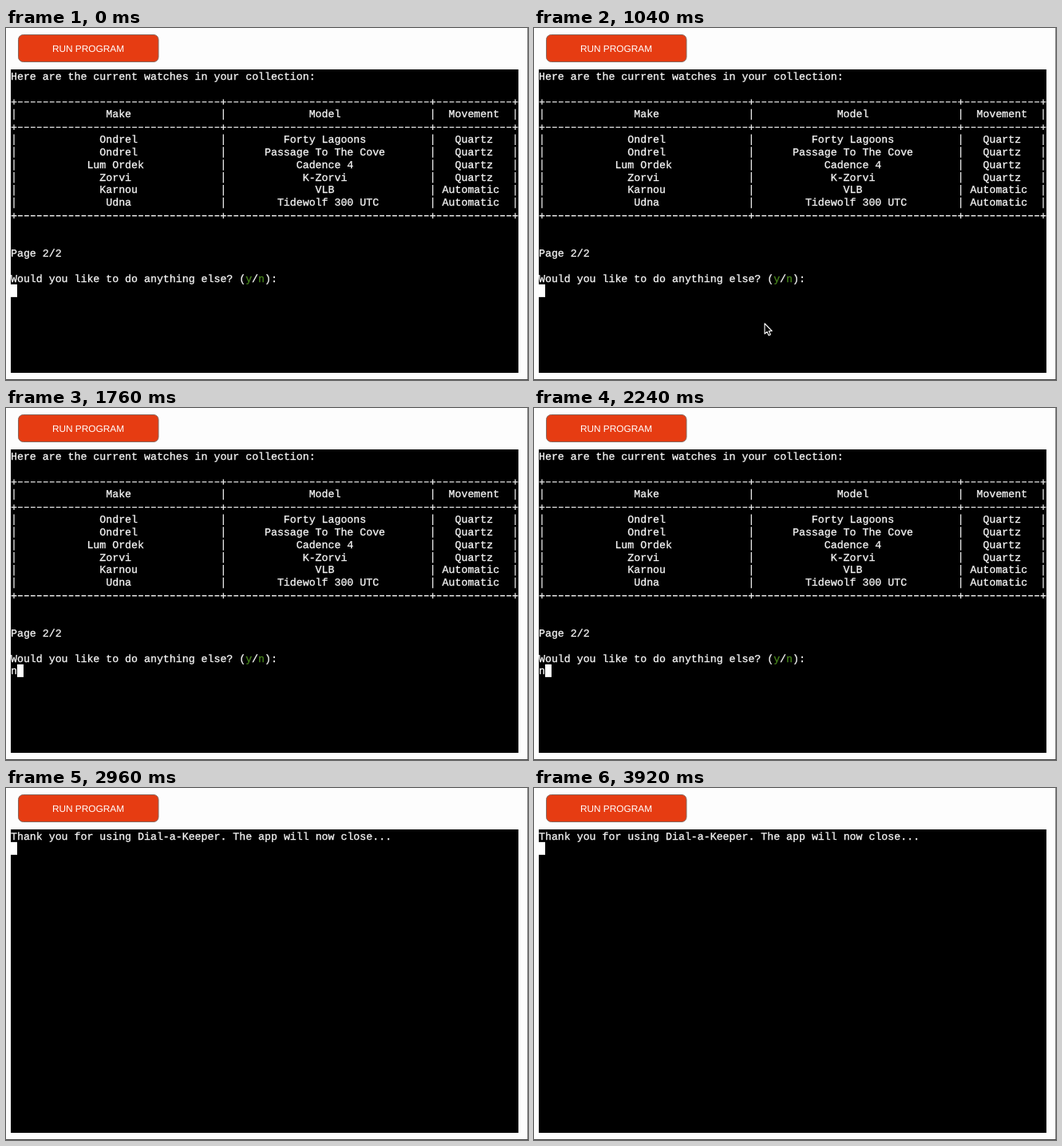
Write an HTML page that moves like this. It is 654x442 px and loops after 4 s.

```html
<!DOCTYPE html>
<html lang="en">
<head>
<meta charset="utf-8">
<title>Terminal</title>
<style>
  html, body { margin: 0; width: 100%; height: 100%; overflow: hidden; background: #fdfdfd; }
  svg { display: block; width: 654px; height: 442px; }
  .term text {
    font: 13.25px "Liberation Mono", "Courier New", monospace;
    fill: #f6f6f6; stroke: #f6f6f6; stroke-width: .3;
    white-space: pre; text-rendering: geometricPrecision;
  }
  .term .key { fill: #47851c; stroke: #47851c; }
  .rule { fill: none; stroke: #e8e8e8; stroke-width: 1.3; }
  .label { font: 11.85px "Liberation Sans", Arial, sans-serif; fill: #fff; text-anchor: middle; text-rendering: geometricPrecision; }
</style>
</head>
<body>
<svg viewBox="0 0 654 442">
  <rect width="654" height="442" fill="#fdfdfd"/>
  <rect x="15.5" y="8.5" width="175.5" height="34" rx="6" fill="#e63c12" stroke="#86685e"/>
  <text class="label" x="103" y="29.8">RUN PROGRAM</text>
  <rect x="6" y="52" width="636" height="381"/>
  <path d="M653.5 0V442" stroke="#8a8a8a"/>
  <path d="M0 441.5H654" stroke="#444"/>
  <g class="term">
    <g id="list"></g>
    <g id="bye"></g>
    <rect id="caret" width="8" height="16" fill="#fff"/>
  </g>
  <path id="mouse" d="M0 0V13L3 10.3L5.1 15L7.3 14L5.3 9.5H9.2Z" fill="#000" stroke="#fff" stroke-width="1.1" stroke-linejoin="round"/>
</svg>
<script>
const LOOP = 4000, LEFT = 6, TOP = 52, CW = 7.95, RH = 15.875;
const TYPE_AT = 1280, CLEAR_AT = 2400;
const MOVE = { start: 160, end: 480, from: [398, 436], to: [289, 371] };
const COLS = [[1, 32], [34, 32], [67, 12]];
const EDGES = [0, 33, 66, 79];

const $ = id => document.getElementById(id);
const list = $("list"), bye = $("bye"), caret = $("caret"), mouse = $("mouse");
const colX = c => LEFT + c * CW;
const rowY = r => TOP + r * RH;

function add(parent, tag, attrs, text = "") {
  const el = document.createElementNS("http://www.w3.org/2000/svg", tag);
  for (const k in attrs) el.setAttribute(k, attrs[k]);
  el.textContent = text;
  return parent.appendChild(el);
}

function print(parent, row, col, text, cls = "") {
  return add(parent, "text", { x: colX(col), y: rowY(row) + 12.6, class: cls }, text);
}

function border(row) {
  const y = rowY(row) + 9.1;
  let d = "";
  for (let c = 0; c < 80; c++) {
    const x = colX(c + .5), half = EDGES.includes(c) ? 3.4 : 2.9;
    d += `M${x - half} ${y}h${2 * half}`;
    if (half > 3) d += `M${x} ${y - 3.4}v6.8`;
  }
  add(list, "path", { d, class: "rule" });
}

function record(row, cells) {
  const d = EDGES.map(c => `M${colX(c + .5)} ${rowY(row) + 2}v13.6`).join("");
  add(list, "path", { d, class: "rule" });
  cells.forEach((s, i) => {
    const [start, width] = COLS[i];
    print(list, row, start + Math.floor((width - s.length) / 2), s);
  });
}

print(list, 0, 0, "Here are the current watches in your collection:");
[2, 4, 11].forEach(border);
record(3, ["Make", "Model", "Movement"]);
[
  ["Ondrel", "Forty Lagoons", "Quartz"],
  ["Ondrel", "Passage To The Cove", "Quartz"],
  ["Lum Ordek", "Cadence 4", "Quartz"],
  ["Zorvi", "K-Zorvi", "Quartz"],
  ["Karnou", "VLB", "Automatic"],
  ["Udna", "Tidewolf 300 UTC", "Automatic"]
].forEach((cells, i) => record(5 + i, cells));
print(list, 14, 0, "Page 2/2");
print(list, 16, 0, "Would you like to do anything else? (");
print(list, 16, 37, "y", "key");
print(list, 16, 38, "/");
print(list, 16, 39, "n", "key");
print(list, 16, 40, "):");
const answer = print(list, 17, 0, "n");
print(bye, 0, 0, "Thank you for using Dial-a-Keeper. The app will now close...");

const show = (el, on) => el.setAttribute("visibility", on ? "visible" : "hidden");

function render(t) {
  const cleared = t >= CLEAR_AT, typed = t >= TYPE_AT && !cleared;
  show(list, !cleared);
  show(bye, cleared);
  show(answer, typed);
  caret.setAttribute("x", colX(typed ? 1 : 0));
  caret.setAttribute("y", rowY(cleared ? 1 : 17));

  const p = Math.min(1, Math.max(0, (t - MOVE.start) / (MOVE.end - MOVE.start)));
  const ease = 1 - (1 - p) ** 2;
  const [x, y] = MOVE.from.map((a, i) => a + (MOVE.to[i] - a) * ease);
  mouse.setAttribute("transform", `translate(${x} ${y})`);
  show(mouse, t >= MOVE.start && t < TYPE_AT);
}

const begin = performance.now();
function tick() {
  render((performance.now() - begin) % LOOP);
  requestAnimationFrame(tick);
}
tick();
</script>
</body>
</html>
```
